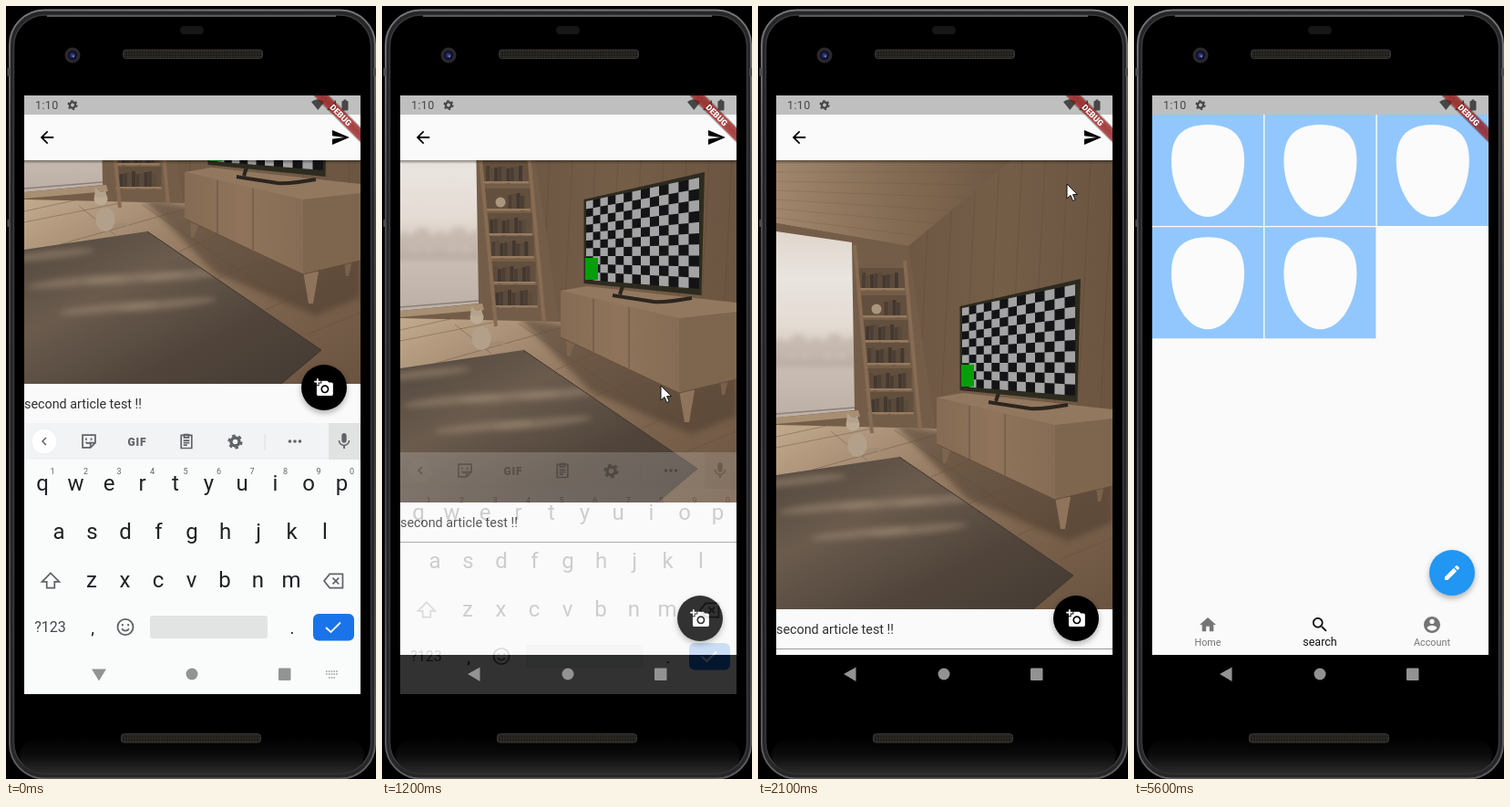
These frames come from a looping animation (406x847 px, 6.4 s). An HTML page:

```html
<!DOCTYPE html>
<html lang="en">
<head>
<meta charset="utf-8">
<title>Article editor demo</title>
<style>
html, body { margin: 0; width: 100%; height: 100%; overflow: hidden; background: #000; }
svg { display: block; width: 100vw; height: 100vh; font-family: Roboto, "Open Sans", sans-serif; }
.fab { filter: drop-shadow(0 3px 3px rgba(0, 0, 0, .3)); }
</style>
</head>
<body>
<svg id="stage" viewBox="0 0 406 847"></svg>
<script>
const LOOP = 6400, STEP = 100, SCALE = 0.897;
const stage = document.getElementById('stage');

const rect = (x, y, w, h, fill, extra = '') =>
  `<rect x="${x}" y="${y}" width="${w}" height="${h}" fill="${fill}" ${extra}/>`;
const poly = (points, fill, extra = '') => `<polygon points="${points}" fill="${fill}" ${extra}/>`;
const disc = (x, y, r, fill, extra = '') => `<circle cx="${x}" cy="${y}" r="${r}" fill="${fill}" ${extra}/>`;
const oval = (x, y, rx, ry, fill, extra = '') =>
  `<ellipse cx="${x}" cy="${y}" rx="${rx}" ry="${ry}" fill="${fill}" ${extra}/>`;
const line = (d, stroke, width = 1, extra = '') =>
  `<path d="${d}" fill="none" stroke="${stroke}" stroke-width="${width}" ${extra}/>`;
const text = (x, y, size, fill, str, extra = '') =>
  `<text x="${x}" y="${y}" font-size="${size}" fill="${fill}" ${extra}>${str}</text>`;
const middle = 'text-anchor="middle"', soft = 'filter="url(#soft)"';
const times = (n, fn) => Array.from({ length: n }, (_, i) => fn(i)).join('');

// 24-unit icons, centred on x, y
const icon = (x, y, body, fill, scale = SCALE, extra = '') =>
  `<g transform="translate(${x} ${y}) scale(${scale}) translate(-12 -12)" fill="${fill}" ${extra}>${body}</g>`;
const shape = d => `<path d="${d}"/>`;
const outline = (x, y, d, color, scale, width = 2) =>
  icon(x, y, shape(d), 'none', scale, `stroke="${color}" stroke-width="${width}"`);
const gear = (x, y, color, scale) => icon(x, y,
  `<circle cx="12" cy="12" r="5.6" stroke-width="4.2"/>
   <circle cx="12" cy="12" r="8.6" stroke-width="3" stroke-dasharray="4.5 4.5"/>`,
  'none', scale, `stroke="${color}"`);

const ICON = {
  back: shape('M20 11H7.83l5.59-5.59L12 4l-8 8 8 8 1.41-1.41L7.83 13H20v-2z'),
  send: shape('M2.01 21L23 12 2.01 3 2 10l15 2-15 2z'),
  photo: shape('M3 4V1h2v3h3v2H5v3H3V6H0V4h3zm3 6V7h3V4h7l1.83 2H21c1.1 0 2 .9 2 2v12c0 1.1-.9 2-2 2H5c-1.1 0-2-.9-2-2V10h3zm7 9c2.76 0 5-2.24 5-5s-2.24-5-5-5-5 2.24-5 5 2.24 5 5 5zm-3.2-5c0 1.77 1.43 3.2 3.2 3.2s3.2-1.43 3.2-3.2-1.43-3.2-3.2-3.2-3.2 1.43-3.2 3.2z'),
  edit: shape('M3 17.25V21h3.75L17.81 9.94l-3.75-3.75L3 17.25zM20.71 7.04c.39-.39.39-1.02 0-1.41l-2.34-2.34c-.39-.39-1.02-.39-1.41 0l-1.83 1.83 3.75 3.75 1.83-1.83z'),
  home: shape('M10 20v-6h4v6h5v-8h3L12 3 2 12h3v8z'),
  search: shape('M15.5 14h-.79l-.28-.27C15.41 12.59 16 11.11 16 9.5 16 5.91 13.09 3 9.5 3S3 5.91 3 9.5 5.91 16 9.5 16c1.61 0 3.09-.59 4.23-1.57l.27.28v.79l5 4.99L20.49 19l-4.99-5zm-6 0C7.01 14 5 11.99 5 9.5S7.01 5 9.5 5 14 7.01 14 9.5 11.99 14 9.5 14z'),
  account: shape('M12 2C6.48 2 2 6.48 2 12s4.48 10 10 10 10-4.48 10-10S17.52 2 12 2zm0 3c1.66 0 3 1.34 3 3s-1.34 3-3 3-3-1.34-3-3 1.34-3 3-3zm0 14.2c-2.5 0-4.71-1.28-6-3.22.03-1.99 4-3.08 6-3.08 1.99 0 5.97 1.09 6 3.08-1.29 1.94-3.5 3.22-6 3.22z'),
  mic: shape('M12 14c1.66 0 3-1.34 3-3V5c0-1.66-1.34-3-3-3S9 3.34 9 5v6c0 1.66 1.34 3 3 3zm5.3-3c0 3-2.54 5.1-5.3 5.1S6.7 14 6.7 11H5c0 3.41 2.72 6.23 6 6.72V21h2v-3.28c3.28-.48 6-3.3 6-6.72h-1.7z')
};

const gradient = (id, dir, ...stops) => `<linearGradient id="${id}" ${dir}>` + stops.map((c, i) =>
  `<stop offset="${i / (stops.length - 1)}" stop-color="${c}"/>`).join('') + '</linearGradient>';
const DOWN = 'x1="0" y1="0" x2="0" y2="1"', ACROSS = 'x1="0" y1="0" x2="1" y2="0"', SLANT = 'x1="0" y1="0" x2="1" y2="1"';

const defs = `<defs>
  ${gradient('ceiling', ACROSS, '#9f866c', '#846b53', '#6d5743')}
  ${gradient('wall', ACROSS, '#6a5440', '#6c5642', '#755e48', '#6b5541')}
  ${gradient('window', DOWN, '#e0d6cb', '#e9e4df', '#e4dbd3', '#c9bdb3', '#bcafa6')}
  ${gradient('floor', SLANT, '#c2aa8e', '#9a8067', '#7a624c', '#6a5340')}
  ${gradient('rug', SLANT, '#51463c', '#6a5b4d', '#51453b', '#443a32')}
  ${gradient('cabinet', ACROSS, '#856b53', '#8f745b', '#866c54')}
  ${gradient('shade', DOWN, 'rgba(0,0,0,.4)', 'rgba(0,0,0,0)')}
  ${gradient('rim', DOWN, '#77777a', '#4a4a4c', '#3c3c3e', '#4a4a4c', '#5e5e60')}
  ${gradient('chin', DOWN, '#000', '#0b0b0b', '#2a2a2b')}
  <pattern id="mesh" width="3" height="3" patternUnits="userSpaceOnUse">
    <rect width="3" height="3" fill="#1c1b18"/><circle cx="1.5" cy="1.5" r=".9" fill="#36342d"/></pattern>
  <filter id="soft"><feGaussianBlur stdDeviation="3"/></filter>
  <clipPath id="app"><rect x="20" y="98" width="369" height="613"/></clipPath>
  <clipPath id="screen"><rect x="20" y="98" width="369" height="656"/></clipPath>
  <clipPath id="rugArea"><polygon points="20,514 155,494 346,624 302,661 20,661"/></clipPath>
  <clipPath id="floorArea"><polygon points="20,459 195,463 389,520 389,661 20,661"/></clipPath>
  <clipPath id="glass"><polygon points="20,247 103,259 106,443 20,451"/></clipPath>
  <clipPath id="bar"><rect x="20" y="116" width="369" height="53"/></clipPath>
</defs>`;

function phone() {
  const speaker = (x, y) => rect(x, y, 153, 9.5, 'url(#mesh)', 'rx="3" stroke="#383838"');
  return rect(0, 0, 406, 847, '#000') +
    rect(4, 4.5, 401, 842, '#262628', 'rx="38" stroke="url(#rim)" stroke-width="2"') +
    rect(8.5, 10, 392, 831, '#000', 'rx="34" stroke="#3a3a3c" stroke-width="1.5"') +
    rect(15, 800, 378, 41, 'url(#chin)', 'rx="28"') +
    line('M45 11H362', '#6c6c6f', 1.5) +
    line('M3 68V77M3 234V242M404.5 68V77', '#4c4c4e', 3) +
    rect(191, 22, 26, 9, '#171718', 'rx="4.5"') +
    disc(73, 54, 8.5, '#2a2a2e') + disc(73, 54, 5.5, '#14142a') + disc(73, 54, 2.6, '#2a3a82') + disc(74, 55, 1, '#8090c0');
}
const speakers = [[128.5, 48], [126.5, 797.5]].map(([x, y]) =>
  rect(x, y, 153, 9.5, 'url(#mesh)', 'rx="3" stroke="#383838"')).join('');

function television() {
  const cols = 13, rows = 10;
  const spot = (i, j) => {
    const s = i / cols, u = 0.78 * s + 0.22 * s * s, v = j / rows;
    return `${(224 + 124 * u).toFixed(1)},${(331 - 26 * u + v * (86 + 36 * u)).toFixed(1)}`;
  };
  const cells = times(cols * rows, k => {
    const i = k % cols, j = Math.floor(k / cols);
    return (i + j) % 2 ? '' : poly([spot(i, j), spot(i + 1, j), spot(i + 1, j + 1), spot(i, j + 1)].join(' '), '#a3a3a4');
  });
  return line('M264 424L261 433M253 434L298 441Q312 442 340 437', '#2b251e', 4) +
    poly('221.5,329 354,299 350.5,434 221.5,421', '#2d2b1f') +
    poly('224,331 348,305 348,427 224,417', '#141416') + cells + rect(223, 393, 14, 24, '#05a005');
}

function shelf() {
  const boards = [309, 339, 366, 391, 419, 445];
  return boards.map((y, i) => {
    const x = 111 + i * 2.1, w = 51 - i * 0.2;
    const books = times(9, k => i === 1 && k < 5 ? '' :
      rect(x + 3 + k * 4.5, y - 17 + (k * 7 + i * 3) % 4, 4, 17, ['#4b3e34', '#5a4a3c', '#433830'][(k + i) % 3]));
    return rect(x - 1, y - 22, w, 22, '#634f3d') + books + rect(x - 1, y, w, 2.5, '#967a5f');
  }).join('') + disc(130, 332, 5.5, '#ab967f') +
    line('M106 262L125 468M161 279L178 464', '#876b52', 4);
}

function room() {
  const planks = times(9, i => line(`M${190 + i * 25} 169L${176 + i * 25} 440`, '#4f3c2d', .7, 'opacity=".35"'));
  const streaks = times(6, i => oval(45 + i * 32, 520 + (i * 29) % 62, 55, 5,
    '#a08c77', `opacity=".5" transform="rotate(-6 ${45 + i * 32} 545)"`));
  return rect(20, 169, 369, 492, 'url(#wall)') + planks +
    poly('20,169 278,169 165,263 20,238', 'url(#ceiling)') +
    times(6, i => line(`M20 ${182 + i * 10}L${262 - i * 17} ${182 + i * 14}`, '#5f4a38', .7, 'opacity=".3"')) +
    poly('20,238 165,263 195,466 20,466', '#745d48') +
    poly('20,247 103,259 106,443 20,451', 'url(#window)') +
    `<g clip-path="url(#glass)"><g ${soft} opacity=".5">${times(5, i => oval(24 + i * 20, 378 - (i * 5) % 9, 11, 13, '#b3a59a'))}
      ${rect(15, 386, 95, 10, '#a99c93')}</g></g>` +
    line('M20 447L106 440', '#8b8079', 1.5) + poly('20,451 110,443 112,450 20,458', '#a88f74') +
    poly('20,459 195,463 389,520 389,661 20,661', 'url(#floor)') +
    `<g clip-path="url(#floorArea)">${poly('150,458 389,500 389,566 340,586 230,540', '#4c3b2d', `opacity=".55" ${soft}`)}</g>` +
    line('M20 484L125 463M60 508L195 470M190 516L240 494M232 545L290 522M285 580L350 550M330 607L389 583M75 460L20 472M80 466L120 498M150 465L290 560', '#5f4a38', .8, 'opacity=".5"') +
    shelf() +
    poly('20,514 155,494 346,624 302,661 20,661', 'url(#rug)') +
    `<g clip-path="url(#rugArea)"><g ${soft}>${streaks}</g></g>` +
    line('M155 494L346 624L302 661', '#40352c', 1) +
    line('M118 489Q129 484 133 487', '#a08a73', 3.5, 'stroke-linecap="round"') +
    oval(109, 481, 10.5, 13, '#b3a08b') + disc(104, 458, 7.5, '#bcaa95') +
    poly('97,456 98,446 104,452 109,449 111,457', '#b5a28d') +
    poly('202,481 212,485 206,501 203,501', '#7d644e') + poly('326,538 343,538 337,573 332,573', '#8f745c') +
    poly('371,527 380,526 376,543 373,543', '#7a614b') +
    poly('196,429 225,424 389,442 389,453 326,461', '#937860') +
    poly('196,429 326,459 326,541 196,480', 'url(#cabinet)') + poly('326,459 389,452 389,526 326,541', '#7e654e') +
    line('M232 438V496M271 447V514M196 480L326 541L389 526', '#5f4a38', .8) +
    television();
}

const fab = (id, color, body) =>
  `<g id="${id}"><g class="fab">${disc(349, 0, 25, color)}</g>${icon(349, 0, body, '#fff')}</g>`;

function postPage() {
  return `<g id="post">${rect(20, 98, 369, 613, '#fafafa')}<g id="content">${room()}
    ${text(20, 688, 14.35, '#303030', 'second article test !!')}${rect(20, 704, 369, 1, '#9b9b9b')}</g>
    ${rect(20, 169, 369, 4, 'url(#shade)')}${rect(20, 98, 369, 71, '#fafafa')}
    <g clip-path="url(#bar)">${disc(367, 144, 20, '#000', 'id="ripple"')}</g>
    ${icon(45, 144, ICON.back, '#000')}${icon(367, 144, ICON.send, '#000')}
    ${fab('photoFab', '#000', ICON.photo)}</g>`;
}

function searchPage() {
  const cells = times(5, k => `<g transform="translate(${(k % 3) * 123.4} ${Math.floor(k / 3) * 123.3})">
    ${rect(20, 119, 122, 122, '#92c7fd')}
    <path d="M81 130C115 130 121 150 121 170C121 200 104 231 81 231C58 231 41 200 41 170C41 150 47 130 81 130Z" fill="#fbfbfb"/></g>`);
  const tab = (x, body, label, size, color) =>
    icon(x, 678, body, color) + text(x, 701, size, color, label, middle);
  return rect(20, 98, 369, 613, '#fafafa') + cells +
    tab(81, ICON.home, 'Home', 10.8, '#757575') + tab(204, ICON.search, 'search', 12.5, '#111') +
    tab(327, ICON.account, 'Account', 10.8, '#757575');
}

function statusBar() {
  const ink = '#474747';
  return rect(20, 98, 369, 21, '#bfbfbf') + text(32, 113, 12.5, ink, '1:10', 'letter-spacing=".4"') +
    gear(73, 108.5, ink, .55) +
    `<path d="M335 105Q342 99.500 349.500 105L342.300 114Z" fill="${ink}"/>` +
    poly('352,114 362,114 362,103', ink) + rect(368.5, 104, 7, 10.5, ink, 'rx="1"') + rect(370.5, 102.5, 3, 2, ink) +
    `<g transform="translate(389 98) rotate(45)">${rect(-40, 25.1, 80, 10.8, '#000', `opacity=".5" ${soft}`)}
      ${rect(-40, 25.1, 80, 10.8, '#b71c1c', 'opacity=".63"')}
      ${text(0, 33.8, 9.1, '#fff', 'DEBUG', middle + ' font-weight="900"')}</g>`;
}

function keyboard() {
  const ink = '#202124', gray = '#5f6368';
  const row = (letters, x, y) => [...letters].map((c, i) => text(x + i * 36.5, y, 24, ink, c, middle)).join('');
  return rect(20, 457, 369, 330, '#fafbfb') + rect(20, 457, 369, 40, '#f2f3f4') + rect(354, 457, 35, 40, '#e1e2e2') +
    disc(42, 477, 14, '#fff', 'stroke="#e6e6e6" stroke-width=".6"') + line('M44 473L40 477L44 481', gray, 1.5) +
    outline(91, 477, 'M4 4H20V14L14 20H4ZM20 14H14V20M8.500 8V10.500M15 8V10.500M8 13Q11 16 14 13', gray, .87) +
    text(144, 481.500, 12, gray, 'GIF', middle + ' font-weight="900" letter-spacing=".8"') +
    outline(198, 477, 'M5 4H19V21H5ZM9 3H15V7H9ZM8 11H16M8 14H16M8 17H13', gray, .83) +
    gear(251.5, 477.5, gray, .8) + line('M284 468V487', '#dcdee0') +
    times(3, i => disc(311.5 + i * 5.5, 477, 1.8, gray)) + icon(371, 477, ICON.mic, gray) +
    row('qwertyuiop', 40, 531) + times(10, i => text(51 + i * 36.5, 513, 9, gray, (i + 1) % 10, middle)) +
    row('asdfghjkl', 58, 584) + row('zxcvbnm', 94, 637) +
    outline(49, 630, 'M12 3L2 13H7.500V20H16.500V13H22Z', gray, .95, 1.8) +
    outline(359, 630, 'M8 4H23V20H8L1.500 12ZM11.500 8.500L18.500 15.500M18.500 8.500L11.500 15.500', gray, .95, 1.8) +
    text(48.5, 686, 16, '#45484c', '?123', middle) + text(95, 688, 19, ink, ',', middle) + text(314, 688, 19, ink, '.', middle) +
    icon(131, 680.5, '<circle cx="12" cy="12" r="9.5"/><path d="M7.500 14Q12 19 16.500 14M8.500 8V10.500M15.500 8V10.500"/>',
      'none', .9, `stroke="${gray}" stroke-width="2"`) +
    rect(158, 668, 129, 25, '#e2e3e3', 'rx="3"') + rect(337, 666, 45, 29.5, '#1a73e8', 'rx="6" id="enter"') +
    line('M351 681L356.500 686L367 675.500', '#fff', 1.8) +
    line('M351 729H364M351 732H364M354 736H361', '#9a9a9a', 1.4, 'stroke-dasharray="1.6 1.2"');
}

stage.innerHTML = defs + phone() + speakers + rect(20, 98, 369, 656, '#000') +
  `<g clip-path="url(#app)">${searchPage()}${postPage()}${fab('editFab', '#2196f3', ICON.edit)}${statusBar()}</g>
  <g clip-path="url(#screen)"><g id="keys">${keyboard()}</g></g>
  <path id="navBack" fill="#939393"/>${disc(204, 732, 6.5, '#939393')}${rect(299, 725.5, 13.5, 13.5, '#939393', 'rx="1"')}
  <path id="cursor" d="M0 0V16L4 12.500L6.600 18.500L9.200 17.400L6.600 11.600H11.500Z" fill="#fff" stroke="#111"/>`;

const el = id => document.getElementById(id);
const set = (id, attrs) => { for (const k in attrs) el(id).setAttribute(k, attrs[k]); };
const show = (id, on) => set(id, { visibility: on ? 'visible' : 'hidden' });
const shift = (x, y) => `translate(${x} ${y})`;

// time, x, y
const POINTER = [[100, 148, 428], [600, 350, 677], [800, 350, 677], [1100, 307, 640], [1300, 305, 192],
  [1400, 306, 141], [1500, 306, 123], [1700, 306, 125], [2100, 339, 195], [2400, 363, 137],
  [2600, 363, 137], [2700, 360, 140], [3200, 360, 140]];
// time, offset, opacity
const CLOSING = [[900, 0, 1], [1000, 4, .94], [1100, 15, .7], [1200, 32, .2], [1300, 43, 0]];

function track(keys, t) {
  if (t <= keys[0][0]) return keys[0].slice(1);
  for (let i = 1; i < keys.length; i++) {
    const a = keys[i - 1], b = keys[i];
    if (t <= b[0]) {
      const p = (t - a[0]) / (b[0] - a[0]);
      return [a[1] + (b[1] - a[1]) * p, a[2] + (b[2] - a[2]) * p];
    }
  }
  return keys[keys.length - 1].slice(1);
}

function draw(t) {
  const leaving = t >= 5500, done = t >= 5600;

  const scroll = t <= 1100 ? 247 : Math.min(247, 38 * Math.exp((1300 - t) / 89));
  set('content', { transform: shift(0, -Math.round(scroll)) });
  set('post', { transform: shift(0, leaving ? 5 : 0), opacity: leaving ? .65 : 1 });
  show('post', !done);
  set('photoFab', { transform: shift(0, t < 1100 ? 418 : 671), opacity: leaving ? 0 : 1 });
  set('editFab', { transform: shift(0, done ? 621 : 662) });
  show('editFab', leaving);

  const [drop, alpha] = track(CLOSING, t);
  set('keys', { transform: shift(0, drop), opacity: alpha });
  set('enter', { fill: t === 800 ? '#185fbe' : '#1a73e8' });
  set('navBack', { d: t < 1000 ? 'M94 726.500H110L102 739.500Z' : 'M107.500 724.500V740L94 732Z' });

  const press = t >= 3000 && t < 3300;
  set('ripple', { r: 10 + (t - 3000) * .05, opacity: press ? .1 - (t - 3000) * .0003 : 0 });
  if (!press) set('ripple', { r: 0 });

  const [x, y] = track(POINTER, t);
  set('cursor', { transform: shift(x, y) });
  show('cursor', t >= 100 && t < 3300);
}

function tick() {
  draw(Math.floor(performance.now() % LOOP / STEP) * STEP);
  requestAnimationFrame(tick);
}
tick();
</script>
</body>
</html>
```
